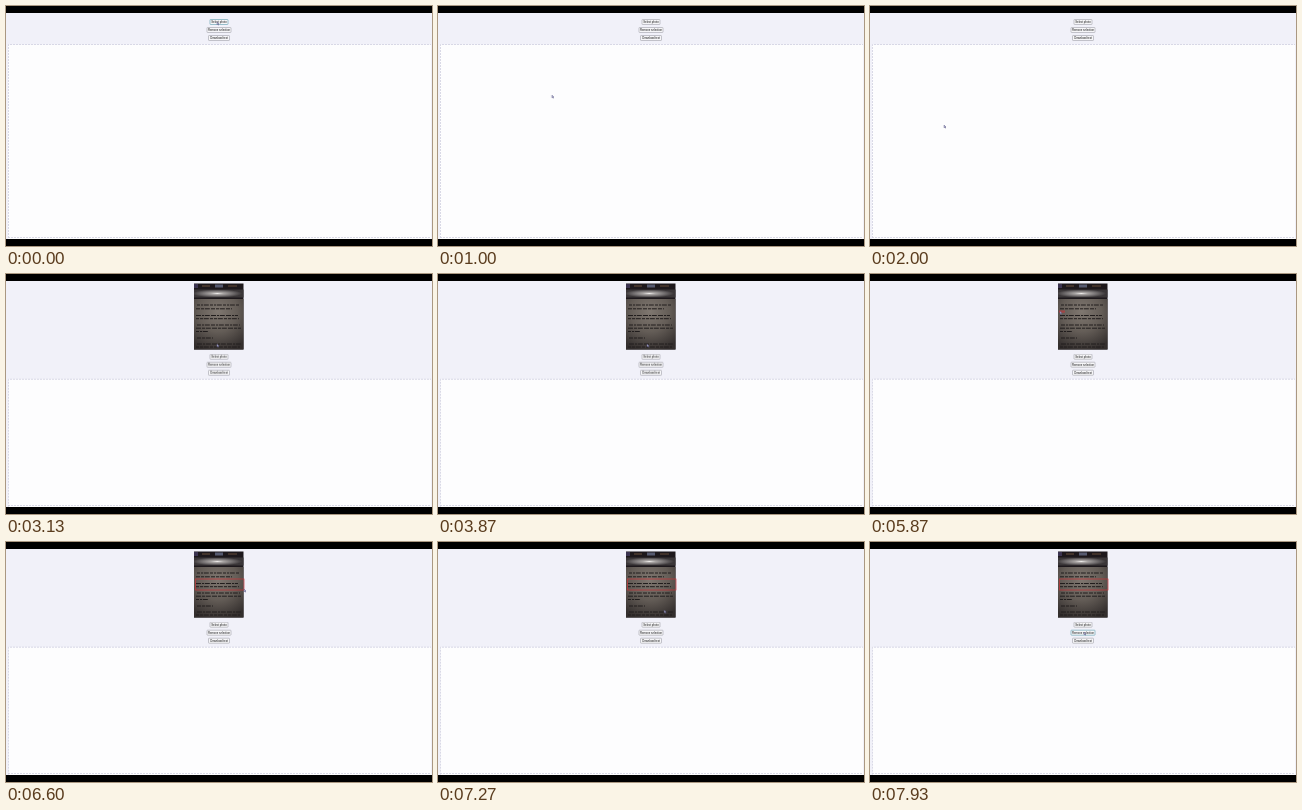
These frames come from a looping animation (426 by 240 pixels, 8 s). An HTML page:

```html
<!DOCTYPE html>
<html lang="en">
<head>
<meta charset="utf-8">
<title>Region selection demo</title>
<style>
  html, body { margin: 0; width: 100%; height: 100%; overflow: hidden; background: #000; }
  svg { display: block; width: 100%; height: 100%; }
  text { font-family: "Liberation Sans", Arial, sans-serif; font-size: 2.8px; fill: #111; text-anchor: middle; }
</style>
</head>
<body>
<svg viewBox="0 0 426 240">
  <defs>
    <radialGradient id="band" cx=".47" cy=".5" r=".5">
      <stop offset="0" stop-color="#eeecea"/>
      <stop offset=".25" stop-color="#a9a5a4"/>
      <stop offset=".65" stop-color="#6f6b6c"/>
      <stop offset="1" stop-color="#3a3638"/>
    </radialGradient>
    <radialGradient id="paper" cx=".48" cy=".25" r=".8">
      <stop offset="0" stop-color="#7f7770"/>
      <stop offset=".5" stop-color="#645d57"/>
      <stop offset="1" stop-color="#332e2d"/>
    </radialGradient>
  </defs>

  <rect y="7" width="426" height="226" fill="#f1f1f9"/>

  <g id="photo" opacity="0">
    <rect x="188" y="9.5" width="49.5" height="66" fill="#1d181c"/>
    <rect x="188" y="10" width="4" height="4" fill="#3b3350"/>
    <rect x="196" y="11" width="8" height="2" fill="#43342c"/>
    <rect x="209" y="10.5" width="8" height="3" fill="#565a70"/>
    <rect x="222" y="11" width="9" height="2" fill="#40312a"/>
    <rect x="188" y="15.5" width="49.5" height="8" fill="url(#band)"/>
    <rect x="188" y="25" width="49.5" height="50.5" fill="url(#paper)"/>
    <g id="lines" stroke="#211d1d" stroke-width="1"/>
  </g>

  <rect id="marked" x="189.5" y="37" width="48.5" height="11" fill="none" stroke="#c8363a" stroke-width=".7" opacity="0"/>

  <g id="lower">
    <rect x="2" y="38.5" width="423" height="300" fill="#fdfdfe"/>
    <path d="M2.5 232V38.5H425" fill="none" stroke="#d0d0e0" stroke-width=".8" stroke-dasharray="2 1"/>
    <g id="buttons"/>
  </g>

  <path d="M2 231.5H425" stroke="#d0d0e0" stroke-width=".8" stroke-dasharray="2 1"/>
  <rect width="426" height="7"/>
  <rect y="233" width="426" height="7"/>
  <path id="cursor" d="M0 0V2.8L.7 2.2 1.2 3.2 1.7 3 1.2 2H2Z" fill="#b5b3d6" stroke="#55527c" stroke-width=".4"/>
</svg>
<script>
  const DURATION = 8000;
  const LOADED = 2600;
  const $ = id => document.getElementById(id);

  function add(parent, tag, attrs, text = "") {
    const el = document.createElementNS("http://www.w3.org/2000/svg", tag);
    for (const [key, value] of Object.entries(attrs)) el.setAttribute(key, value);
    el.textContent = text;
    return parent.appendChild(el);
  }

  function play(el, steps) {
    const frames = steps.map(([time, style]) => ({ offset: time / DURATION, ...style }));
    el.animate(frames, { duration: DURATION, iterations: Infinity });
  }

  const show = (time, from, to) => [
    [0, { ...from, easing: "steps(1, end)" }],
    [time, { ...to, easing: "steps(1, end)" }],
    [DURATION, to]
  ];

  const buttons = [["Select photo", 16, 18], ["Remove selection", 24, 24], ["Download text", 32, 21]]
    .map(([label, y, width]) => {
      const box = add($("buttons"), "rect", {
        x: 213 - width / 2, y: y - 2.5, width, height: 5, rx: .6,
        fill: "#f6f6f8", stroke: "#a2a2aa", "stroke-width": .6
      });
      add($("buttons"), "text", { x: 213, y: y + 1 }, label);
      return box;
    });

  // Each row: baseline, left edge, right edge.
  [[31, 191, 234], [34.8, 190, 226], [41.5, 190, 232], [44.7, 190, 233],
   [51, 191, 234], [54.2, 190, 235], [57.5, 190, 202], [64, 191, 207],
   [70, 191, 235], [73, 190, 234]].forEach(([y, left, right], i) => {
    add($("lines"), "path", {
      d: `M${left} ${y}H${right}`,
      "stroke-dasharray": `${3 + i % 3} 1 ${2 + i % 2} .8 5 1.2`
    });
  });

  play($("photo"), show(LOADED, { opacity: 0 }, { opacity: 1 }));
  play($("lower"), show(LOADED, { transform: "translate(0, 0)" }, { transform: "translate(0, 66.7px)" }));

  const highlight = (from, to) => [
    [0, { stroke: "#a2a2aa", easing: "steps(1, end)" }],
    [from, { stroke: "#5b9cad", easing: "steps(1, end)" }],
    [to, { stroke: "#a2a2aa" }],
    [DURATION, { stroke: "#a2a2aa" }]
  ];
  play(buttons[0], highlight(0, 600));
  play(buttons[1], highlight(7600, DURATION));

  const area = (width, height, opacity) => ({ width: `${width}px`, height: `${height}px`, opacity });
  play($("marked"), [
    [0, area(0, 0, 0)],
    [5800, area(0, 0, 0)],
    [5800, area(0, 0, 1)],
    [6500, area(48.5, 11, 1)],
    [DURATION, area(48.5, 11, 1)]
  ]);

  play($("cursor"), [
    [0, 211, 16], [500, 211, 16], [1300, 74, 119], [2500, 74, 119],
    [3000, 211, 70], [3900, 209, 70], [5000, 189, 37],
    [5800, 189, 37], [6500, 238, 47], [6900, 238, 47], [7650, 214, 90], [DURATION, 214, 90]
  ].map(([time, x, y]) => [time, { transform: `translate(${x}px, ${y}px)`, easing: "ease-in-out" }]));
</script>
</body>
</html>
```
